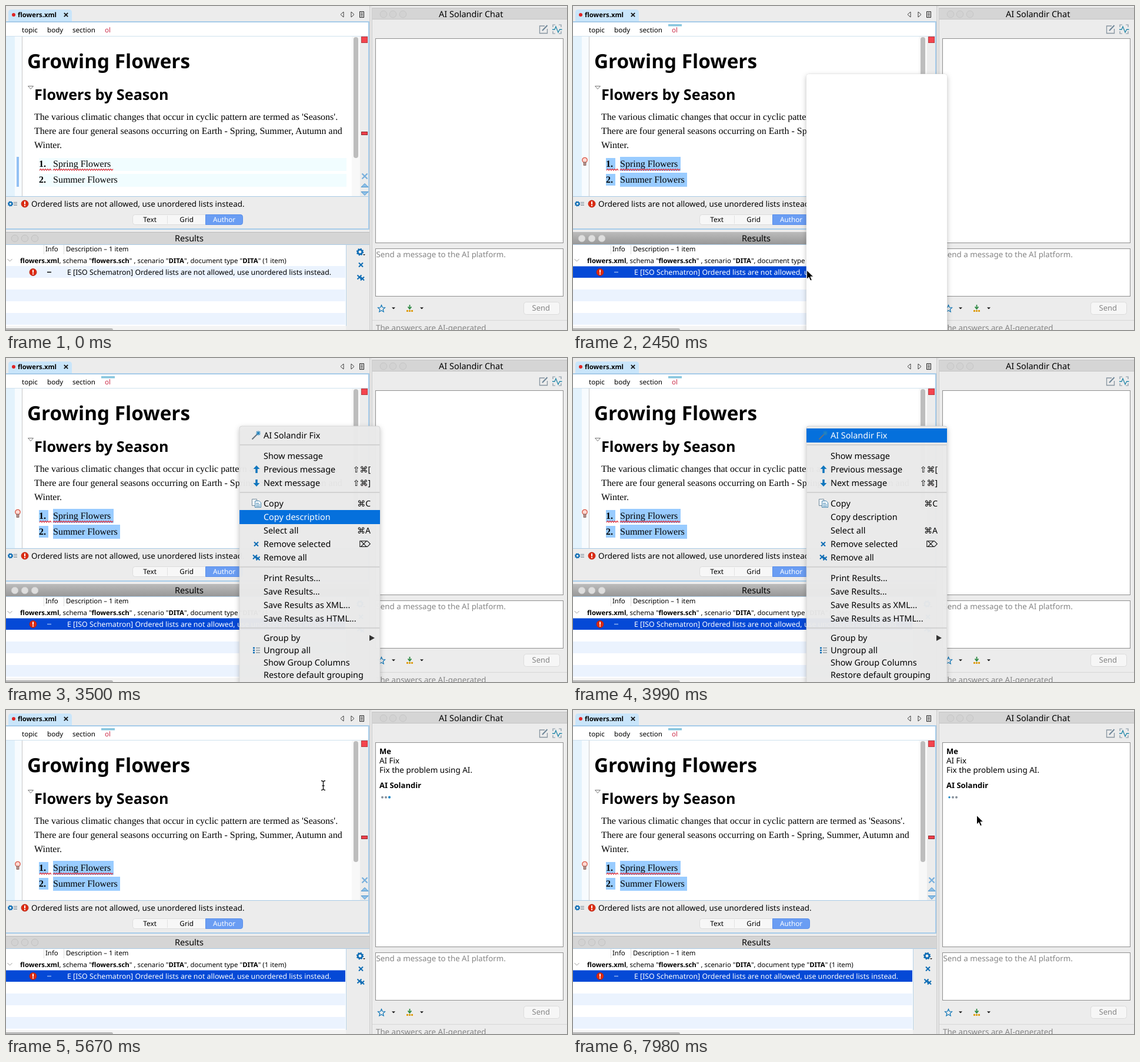
Animation, 954 px wide and 552 px high, one loop 8 s. Source, as an HTML page:

```html
<!DOCTYPE html>
<html lang="en">
<head>
<meta charset="utf-8">
<title>Flowers editor</title>
<style>
html, body { margin: 0; width: 100%; height: 100%; overflow: hidden; background: #ececec; }
svg { position: absolute; left: 0; top: 0; }
text { font-family: 'Noto Sans', 'DejaVu Sans', sans-serif; white-space: pre; text-rendering: geometricPrecision; }
.serif { font-family: 'Liberation Serif', 'Times New Roman', serif; }
.b { font-weight: 700; }
</style>
</head>
<body>
<svg id="stage" width="954" height="552" viewBox="0 0 954 552"></svg>
<script>
const BLUE = '#0d6cb4';
const text = (x, y, size, s, more = '') => `<text x="${x}" y="${y}" font-size="${size}" ${more}>${s}</text>`;
const rect = (x, y, w, h, fill, more = '') => `<rect x="${x}" y="${y}" width="${w}" height="${h}" fill="${fill}" ${more}/>`;
const path = (d, stroke, width = 1, fill = 'none') => `<path d="${d}" stroke="${stroke}" stroke-width="${width}" fill="${fill}"/>`;
const dot = (x, y, r, fill, more = '') => `<circle cx="${x}" cy="${y}" r="${r}" fill="${fill}" ${more}/>`;
const group = (id, ...parts) => `<g id="${id}">${parts.join('')}</g>`;
const serif = (x, y, s, bold = '') => text(x, y, 16, s, `class="serif ${bold}"`);

const cross = (x, y, r, color = BLUE, w = 2) =>
  path(`M${x - r} ${y - r}l${2 * r} ${2 * r}m0 ${-2 * r}l${-2 * r} ${2 * r}`, color, w);
const crosses = (x, y) => cross(x - 2, y - 1, 3.5) + cross(x + 3, y + 1.5, 3);
const gear = (x, y, r) => dot(x, y, r, 'none', `stroke="${BLUE}" stroke-width="${r * .7}"`) +
  dot(x, y, r * 1.4, 'none', `stroke="${BLUE}" stroke-width="${r * .5}" stroke-dasharray="${r * .55}"`);
const alertIcon = (x, y) => dot(x, y, 6, '#dd2c12', 'stroke="#b01c0c" stroke-width=".8"') +
  rect(x - 1, y - 4, 2, 5, '#fff') + rect(x - 1, y + 2, 2, 2, '#fff');
const down = (x, y, r = 3) => path(`M${x - r} ${y - r / 2}h${2 * r}l${-r} ${r}z`, 'none', 0, '#111');
const lights = (xs, y, fill, stroke) => xs.map(x => dot(x, y, 5.8, fill, `stroke="${stroke}"`)).join('');
const wave = (x, end) => {
  let d = `M${x} 280`;
  for (let i = 0; x + i < end; i += 2) d += `l2 ${i % 4 ? 2.4 : -2.4}`;
  return path(d, '#e0303c', 1.2);
};

const editor = [
  rect(0, 0, 618, 381, '#ececec'),
  path('M4 27V11q0-5 5-5H107q5 0 5 5V27z', 'none', 0, '#c9e5fa'),
  dot(13, 15, 3, '#e02424'),
  text(20, 19, 11.3, 'flowers.xml', 'class="b"'),
  cross(102, 15, 3.2, '#111', 1.7),
  path('M574 10v9l-5-4.500zM587 10v9l5-4.500z', '#333', 1, '#fff'),
  path('M601.500 9.500h7v10h-7zM603 12h4m-4 2.500h4m-4 2.500h4', '#222'),
  rect(0, 26, 618, 355, '#a6cbe9'),
  rect(0, 28, 616, 351, '#ececec'),
  rect(0, 28, 616, 24, '#fff'),
  rect(0, 52, 602, 272, '#fff'),
  rect(0, 52, 15, 272, '#e3f2fc'),
  rect(15, 52, 12, 272, '#f7fbfe'),
  path('M27.500 52V324', '#c8c8c8'),
  path('M0 51.500H616', '#cfe1ee'),
  path('M0 324.500H616', '#a9cbe6'),
  text(27, 45, 11.6, 'topic'), text(70, 45, 11.6, 'body'), text(113, 45, 11.6, 'section'),
  text(168, 45, 11.6, 'ol', 'fill="#cc2f4c"'),
  rect(588, 52, 14, 272, '#f8f8f8'),
  rect(591, 53, 8, 206, '#bdbdbd', 'rx="4"'),
  rect(602, 52, 14, 272, '#ececec'),
  rect(604.5, 52.5, 10, 10, '#f4444e', 'stroke="#b53a42"'),
  rect(604.5, 214.5, 10, 5, '#ee3f4a', 'stroke="#8d2a30"'),
  cross(610, 290, 4.5, '#79b0dd', 2.4),
  path('M604 308.500h12l-6-6zM604 316.500h12l-6 6z', '#4b94cd', 1, '#8fc1e8'),
  text(36, 106, 33.3, 'Growing Flowers', 'class="b"'),
  path('M37.500 136.500h9l-4.500 5z', '#777', 1, '#fff'),
  text(48, 160, 25.2, 'Flowers by Season', 'class="b"'),
  serif(48, 194, "The various climatic changes that occur in cyclic pattern are termed as 'Seasons'."),
  serif(48, 218, 'There are four general seasons occurring on Earth - Spring, Summer, Autumn and'),
  serif(48, 242, 'Winter.'),
  group('idle', rect(18, 257, 4, 51, '#92c0f4'), rect(56, 259, 523, 22, '#f1fdff'), rect(56, 286, 523, 22, '#f1fdff')),
  group('picked',
    rect(56, 259, 16, 20, '#99ccff'), rect(80, 257, 103, 24, '#99ccff'),
    rect(56, 286, 16, 20, '#99ccff'), rect(80, 284, 114, 24, '#99ccff'),
    dot(20, 262.5, 4.2, '#ffd9d3', 'stroke="#d8513f" stroke-width="1.3"'),
    rect(18, 266, 4, 5.5, '#b9938c', 'stroke="#6d4a45" stroke-width=".7"')),
  serif(56, 274, '1.', 'b'), serif(80, 274, 'Spring Flowers'),
  serif(56, 301, '2.', 'b'), serif(80, 301, 'Summer Flowers'),
  wave(57, 77), wave(80, 182),
  group('crumb', rect(162, 31, 23, 3.5, '#86c5de')),
  gear(7.5, 337, 2.8), path('M13 334.500h6m-6 2.500h6m-6 2.500h6', '#7d8d9a'),
  alertIcon(32, 337),
  text(43, 342, 13.42, 'Ordered lists are not allowed, use unordered lists instead.'),
  rect(215.5, 355.5, 187, 17, '#f7f7f7', 'rx="4" stroke="#dcdcdc"'),
  path('M274.500 357V371', '#e3e3e3'),
  path('M339.500 355.500H399q3.500 0 3.500 4V368.500q0 4-3.500 4H339.500z', '#5a8fea', 1, '#6a9df3'),
  text(233.3, 368, 11.8, 'Text'), text(295.3, 368, 11.8, 'Grid'),
  text(352, 367.5, 11.7, 'Author', 'fill="#fff"'),
];

const results = [
  rect(0, 385, 618, 21, '#d5d5d5'),
  path('M0 385.500H618', '#bcbcbc'),
  lights([15, 32, 49], 396, '#d2d2d2', '#c2c2c2'),
  group('focus', rect(0, 385, 618, 21, 'url(#bar)'), lights([15, 32, 49], 396, '#dedede', '#cbcbcb')),
  text(287, 401, 14.5, 'Results'),
  rect(0, 406, 578, 146, '#fff'),
  path('M0 406.500H618', '#a9cbe6'),
  path('M578.500 406V545', '#b5d2e8'),
  path('M64.500 407V423M98.500 407V423', '#dcdcdc'),
  text(67, 418, 11.4, 'Info'), text(102, 418, 11.4, 'Description – 1 item'),
  path('M2.500 431l4 4 4-4', '#999'),
  text(24, 438, 11.4, '<tspan class="b">flowers.xml</tspan>, schema "<tspan class="b">flowers.sch</tspan>" , scenario "<tspan class="b">DITA</tspan>", document type "<tspan class="b">DITA</tspan>" (1 item)'),
  ...[443, 483, 523].map(y => rect(0, y, 577, 20, '#ebf3fe')),
  group('rowPick', rect(0, 443.5, 577, 19.5, '#0549d6')),
  alertIcon(46, 453.5),
  '<path id="dash" d="M70 453.500h7" stroke-width="1.500"/>',
  text(104, 458, 12.35, 'E [ISO Schematron] Ordered lists are not allowed, use unordered lists instead.', 'id="rowText"'),
  rect(0, 545, 578, 7, '#f4f4f4'),
  rect(-4, 549, 186, 7, '#bababa', 'rx="3"'),
  gear(602, 419, 3.8), down(609, 424, 2),
  cross(603.5, 441, 3.5), crosses(603, 463),
];

const chat = [
  rect(618, 0, 4, 552, '#e4e4e4'),
  path('M622.500 3V552M618.500 0V552', '#cdcdcd'),
  rect(623, 3, 331, 20, '#d5d5d5'),
  path('M623 3.500H954M623 22.500H954', '#c4c4c4'),
  lights([642, 658, 675], 14, '#d2d2d2', '#c6c6c6'),
  text(736, 19, 14.5, 'AI Solandir Chat'),
  path('M916 34h-8.500v12.500h13V39', '#86939e', 1.3),
  path('M912 42l8.500-9', '#6f8799', 2),
  path('M930 36v-4h4m6 0h4v4m0 7v4h-4m-6 0h-4v-4', '#8396a4', 1.2),
  path('M929 40h4l2-5 4 10 2.500-5h4', '#2186a8', 1.3),
  rect(628.5, 55.5, 319, 348, '#fff', 'stroke="#8f8f8f"'),
  rect(628.5, 413.5, 319, 81, '#fff', 'stroke="#8f8f8f"'),
  text(629.5, 428, 13.35, 'Send a message to the AI platform.', 'fill="#858585"'),
  path('M638.500 509.500l1.700 4 4.300.4-3.300 2.800 1 4.300-3.700-2.300-3.700 2.300 1-4.300-3.300-2.800 4.300-.4z', '#1378b8', 1.2),
  down(659, 515),
  path('M686.500 509v6m-3-2.500l3 3.500 3-3.500', '#2f8a45', 1.8),
  path('M681 519.500h3m1 0h3m1 0h3', '#dd9d15', 3.2),
  down(707, 515),
  rect(880.5, 504.5, 61, 21, '#f6f6f6', 'rx="4" stroke="#dcdcdc"'),
  text(894.5, 519, 13, 'Send', 'fill="#858585"'),
  path('M623 535.500H954', '#d6d6d6'),
  text(629, 553, 13.3, 'The answers are AI-generated', 'fill="#858585"'),
  group('reply',
    text(635, 75, 13, 'Me', 'class="b"'),
    text(635, 91, 13.4, 'AI Fix'),
    text(635, 107, 13.5, 'Fix the problem using AI.'),
    text(635, 133, 13, 'AI Solandir', 'class="b"')),
  group('dots', ...[640, 646, 652].map(x => dot(x, 148.7, 2, '#87909a'))),
];

const items = [
  [132, 'AI Solandir Fix'], [167, 'Show message'], [190, 'Previous message', '⇧⌘['], [213, 'Next message', '⇧⌘]'],
  [248, 'Copy', '⌘C'], [271, 'Copy description'], [294, 'Select all', '⌘A'], [317, 'Remove selected', '⌦'],
  [340, 'Remove all'], [375, 'Print Results...'], [398, 'Save Results...'], [421, 'Save Results as XML...'],
  [444, 'Save Results as HTML...'], [477, 'Group by'], [498, 'Ungroup all'], [519, 'Show Group Columns'],
  [540, 'Restore default grouping'],
];
const shape = 'M397 560V120q0-4 4-4H632q4 0 4 4V560z';
const menu = group('menu',
  `<path d="${shape}" fill="#ebebeb" fill-opacity=".96" stroke="#c6c6c6" stroke-width=".6" filter="url(#shadow)"/>`,
  group('content',
    ...[148, 229, 356, 460].map(y => path(`M397.500 ${y}H635.500`, '#d2d2d2', 2)),
    rect(397, 0, 239, 24, '#0570dc', 'id="hot"'),
    path('M418.500 138.500l9-9', '#67747f', 2),
    path('M429 124v8m-4-4h8m-7-3l6 6m0-6l-6 6', '#2383bd', 1.1),
    path('M426 196v-9', '#0f76bd', 3.5), path('M420.500 189h11l-5.500-6z', 'none', 0, '#0f76bd'),
    path('M426 207v8', '#0f76bd', 3.5), path('M420.500 213h11l-5.500 6z', 'none', 0, '#0f76bd'),
    path('M418.500 240.500h8v11h-8z', '#6c8799', 1, '#fff'),
    path('M423.500 243.500h7l3 3v8h-10zM425 247.500h5m-5 2.500h7m-7 2.500h7', '#4384ad', 1, '#f5fbff'),
    cross(425.5, 317, 3.5), crosses(425.5, 340),
    path('M420 494h3m-3 4h3m-3 4h3', BLUE, 2.4), path('M425 494h7m-7 4h7m-7 4h7', '#60707d', 1.1),
    path('M618 472v10l9-5z', 'none', 0, '#333'),
    ...items.map(([y, s, key = '']) => `<g class="item">${text(438, y + 5, 14.45, s)}${text(620, y + 5, 14, key, 'text-anchor="end"')}</g>`)),
  `<path id="blank" d="${shape}" fill="#fff" fill-opacity=".98"/>`);

const stage = document.getElementById('stage');
stage.innerHTML = `<defs>
  <linearGradient id="bar" x2="0" y2="1"><stop stop-color="#bcbcbc"/><stop offset="1" stop-color="#989898"/></linearGradient>
  <filter id="shadow" x="-10%" y="-5%" width="120%" height="110%"><feDropShadow dx="0" dy="3" stdDeviation="4.500" flood-opacity=".25"/></filter>
  </defs>` + rect(0, 0, 954, 552, '#ececec') + [...editor, ...results, ...chat].join('') + menu +
  '<path id="arrow" d="M0 0V15.500l3.600-3.400 2.600 6 2.700-1.200-2.600-5.700h5z" fill="#000" stroke="#fff"/>' +
  group('beam', path('M536 120.500q3.500 0 3.500 3v10q0 3-3.500 3m7-16q-3.500 0-3.500 3v10q0 3 3.500 3M537.500 129h4', '#111', 1.3));

const $ = id => document.getElementById(id);
const opacity = (id, v) => $(id).setAttribute('opacity', +v);
const dots = [...$('dots').children], rows = [...document.querySelectorAll('.item')];
// [time, index of the menu item under the pointer]
const hover = [[3220, 12], [3290, 10], [3360, 9], [3430, 7], [3500, 5], [3570, 3], [3640, 1], [3850, 0]];

function draw(t) {
  const within = (a, b = 8000) => t >= a && t < b;
  const picked = within(1540);
  opacity('idle', !picked);
  opacity('picked', picked);
  opacity('rowPick', picked);
  opacity('focus', within(1540, 4690));
  opacity('crumb', within(2030));
  $('rowText').setAttribute('fill', picked ? '#fff' : '#000');
  $('dash').setAttribute('stroke', picked ? '#8fb0ee' : '#000');

  opacity('menu', within(2450, 4760) ? Math.min(1, (4760 - t) / 140) : 0);
  opacity('content', within(2520));
  opacity('blank', within(2450, 2520) ? 1 : within(2520, 2590) ? .4 : 0);
  const hot = (hover.filter(([at]) => t >= at).pop() || [0, -1])[1];
  opacity('hot', hot >= 0);
  if (hot >= 0) $('hot').setAttribute('y', items[hot][0] - 12);
  rows.forEach((row, i) => row.setAttribute('fill', i === hot ? '#fff' : '#000'));

  opacity('reply', within(4760));
  opacity('dots', within(4830));
  // each dot in turn turns blue and swells
  const turn = (t - 4620 + 1120) % 1120 / 1120 * 3;
  dots.forEach((d, i) => {
    const lit = i === Math.floor(turn);
    d.setAttribute('fill', lit ? '#1c86c4' : '#87909a');
    d.setAttribute('r', lit ? 1.7 + .7 * Math.sin(Math.PI * (turn % 1)) : 2);
  });

  opacity('beam', within(4900, 5880));
  opacity('arrow', within(1820, 3220) || within(7070));
  $('arrow').setAttribute('transform', t < 5000 ? 'translate(397.500 450)' : 'translate(686.500 179.500)');
}

(function tick() {
  draw(performance.now() % 8000);
  requestAnimationFrame(tick);
})();
</script>
</body>
</html>
```
